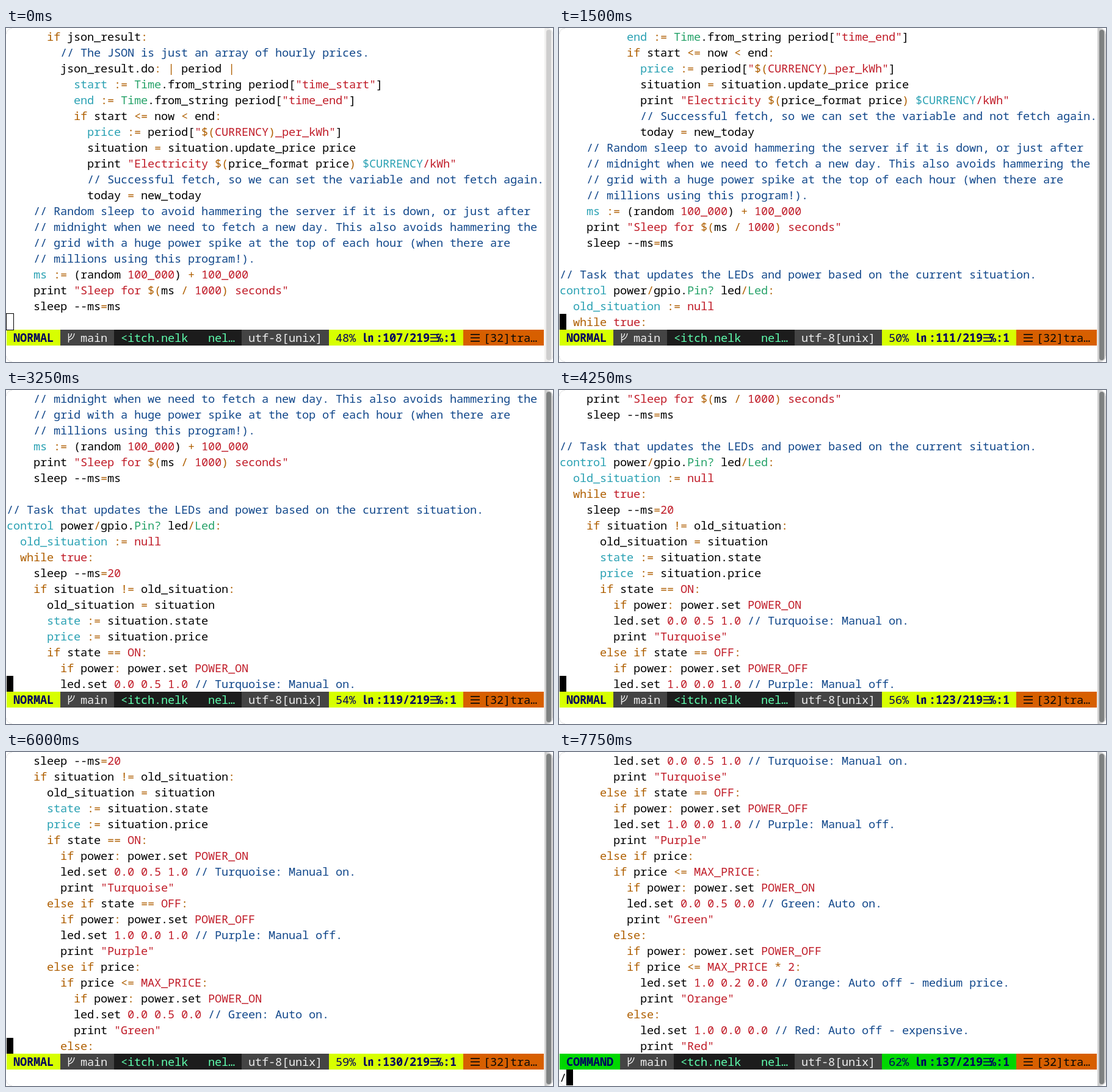
Write an HTML page with a canvas that moves like this. It is 896x548 px and loops after 8000 ms.

```html
<!DOCTYPE html>
<html lang="en">
<head>
<meta charset="utf-8">
<title>Scrolling through code</title>
<style>
  html, body { margin: 0; width: 100%; height: 100%; overflow: hidden; background: #fff; }
  canvas { display: block; }
</style>
</head>
<body>
<canvas id="stage" width="896" height="548"></canvas>
<script>
const FIRST_LINE = 89, TOTAL_LINES = 219, ROWS = 19;
const CELL_W = 11, CELL_H = 26, ASCENT = 20;
const LOOP = 8000, TICK = 250;
const RED = '#c01c28', ORANGE = '#af5f00', CYAN = '#2aa1b3', GREEN = '#26a269', BLUE = '#12488b';
const NAVY = '#00005f';

const source = String.raw`
      if json_result:
        // The JSON is just an array of hourly prices.
        json_result.do: | period |
          start := Time.from_string period["time_start"]
          end := Time.from_string period["time_end"]
          if start <= now < end:
            price := period["$(CURRENCY)_per_kWh"]
            situation = situation.update_price price
            print "Electricity $(price_format price) $CURRENCY/kWh"
            // Successful fetch, so we can set the variable and not fetch again.
            today = new_today
    // Random sleep to avoid hammering the server if it is down, or just after
    // midnight when we need to fetch a new day. This also avoids hammering the
    // grid with a huge power spike at the top of each hour (when there are
    // millions using this program!).
    ms := (random 100_000) + 100_000
    print "Sleep for $(ms / 1000) seconds"
    sleep --ms=ms

// Task that updates the LEDs and power based on the current situation.
control power/gpio.Pin? led/Led:
  old_situation := null
  while true:
    sleep --ms=20
    if situation != old_situation:
      old_situation = situation
      state := situation.state
      price := situation.price
      if state == ON:
        if power: power.set POWER_ON
        led.set 0.0 0.5 1.0 // Turquoise: Manual on.
        print "Turquoise"
      else if state == OFF:
        if power: power.set POWER_OFF
        led.set 1.0 0.0 1.0 // Purple: Manual off.
        print "Purple"
      else if price:
        if price <= MAX_PRICE:
          if power: power.set POWER_ON
          led.set 0.0 0.5 0.0 // Green: Auto on.
          print "Green"
        else:
          if power: power.set POWER_OFF
          if price <= MAX_PRICE * 2:
            led.set 1.0 0.2 0.0 // Orange: Auto off - medium price.
            print "Orange"
          else:
            led.set 1.0 0.0 0.0 // Red: Auto off - expensive.
            print "Red"`.slice(1).split('\n');

// Later rules override earlier ones.
const rules = [
  [/\b([A-Z_]{2,}|\d[\d_.]*|null|true)\b/g, RED],
  [/\b(if|else|while)\b|[:!<]=|[=<:|+*\/]/g, ORANGE],
  [/\b(Time\b|Pin\?|Led\b)/g, GREEN],
  [/\w+(?= :=)|^\w+/g, CYAN],
  [/"[^"$]*"?|(?<=\$\([^)]*\)|\$[A-Z]+\b)[^"$]*"?/g, RED],
  [/\$\(|(?<=\$\([^)]*)\)/g, ORANGE],
  [/\$[A-Z]+/g, CYAN],
  [/\/\/.*/g, BLUE],
];

function highlight(text) {
  const colors = Array(text.length).fill('#000');
  for (const [pattern, color] of rules)
    for (const match of text.matchAll(pattern))
      colors.fill(color, match.index, match.index + match[0].length);
  return { text, colors };
}

const lines = source.map(highlight);
const ctx = document.getElementById('stage').getContext('2d');

const cellX = col => 1 + col * CELL_W;
const cellY = row => 1 + row * CELL_H;

function rect(x, y, w, h, color) {
  ctx.fillStyle = color;
  ctx.fillRect(x, y, w, h);
}

function setFont(weight = 400) {
  ctx.font = `${weight} 18.67px "Noto Sans Mono", "Noto Sans CJK JP", "DejaVu Sans Mono", monospace`;
}

function write(text, col, row, colors) {
  [...text].forEach((char, i) => {
    ctx.fillStyle = Array.isArray(colors) ? colors[i] : colors;
    if (char !== ' ') ctx.fillText(char, cellX(col + i), cellY(row) + ASCENT);
  });
}

function segment(from, to, background) {
  rect(cellX(from), cellY(ROWS), (to - from) * CELL_W, CELL_H, background);
}

function bars(col, color) {
  for (const y of [502, 507.5, 513]) rect(cellX(col) + 1, y, 15, 1.7, color);
}

function branchIcon(col) {
  const x = cellX(col);
  ctx.strokeStyle = '#eee';
  ctx.lineWidth = 1.4;
  ctx.beginPath();
  ctx.moveTo(x + 2.5, 501); ctx.lineTo(x + 2.5, 516);
  ctx.moveTo(x + 2.5, 508); ctx.quadraticCurveTo(x + 7, 507, x + 7.5, 501);
  ctx.moveTo(x + 2.5, 512); ctx.quadraticCurveTo(x + 11, 510, x + 12, 501);
  ctx.stroke();
}

function drawStatus(line, command) {
  const mode = command ? 'COMMAND' : 'NORMAL';
  const accent = command ? '#00d700' : '#d7ff00';
  const branch = mode.length + 2, file = branch + 8;

  segment(0, branch, accent);
  segment(branch, file, '#444');
  segment(file, 35, '#1c1c1c');
  segment(35, 48, '#444');
  segment(48, 68, accent);
  segment(68, 80, '#d75f00');

  branchIcon(branch + 1);
  write('main', branch + 3, ROWS, '#eee');
  write(command ? '<tch.nelk' : '<itch.nelk', file + 1, ROWS, '#5fffaf');
  write('nel…', 30, ROWS, '#5fffaf');
  write('utf-8[unix]', 36, ROWS, '#eee');
  write(Math.floor(line / TOTAL_LINES * 100) + '%', 49, ROWS, NAVY);
  write('[32]tra…', 71, ROWS, '#080808');
  bars(69, '#080808');

  setFont(700);
  write(mode, 1, ROWS, NAVY);
  write('㏑', 53, ROWS, NAVY);
  write(`:${line}/${TOTAL_LINES}`, 55, ROWS, NAVY);
  write('℅:1', 64, ROWS, NAVY);
  bars(63, NAVY);
  setFont();
}

function drawCursor(line, focused, command) {
  if (command) {
    write('/', 0, ROWS + 1, '#000');
    rect(cellX(1), cellY(ROWS + 1), CELL_W, CELL_H, '#000');
  } else if (focused) {
    const { text, colors } = lines[line - FIRST_LINE];
    rect(cellX(0), cellY(ROWS - 1), CELL_W, CELL_H, colors[0] || '#000');
    write(text.slice(0, 1), 0, ROWS - 1, '#fff');
  } else {
    ctx.strokeStyle = '#000';
    ctx.lineWidth = 1;
    ctx.strokeRect(0.5, 468.5, 12, 27);
  }
}

function drawScrollbar(tick) {
  const step = Math.min(tick, 2);
  rect(882, 0, 14, 548, ['#f0efee', '#dfdedd', '#cecece'][step]);
  ctx.fillStyle = ['#cecece', '#a6a7a7', '#7e8181'][step];
  ctx.beginPath();
  ctx.roundRect(885, 3, 8, 542, 4);
  ctx.fill();
}

function drawCorners() {
  ctx.strokeStyle = '#e4e4e4';
  ctx.lineWidth = 1;
  [[10, 10], [886, 10], [886, 538], [10, 538]].forEach(([x, y], i) => {
    ctx.beginPath();
    ctx.arc(x, y, 9.5, Math.PI * (1 + i / 2), Math.PI * (1.5 + i / 2));
    ctx.stroke();
  });
}

function draw(now) {
  const tick = Math.floor(now % LOOP / TICK);
  const scrolled = Math.floor(109.38 + 4.31 * (tick * TICK / 1000 - 1));
  const line = Math.max(107, Math.min(137, scrolled));
  const command = tick === LOOP / TICK - 1;

  rect(0, 0, 896, 548, '#fff');
  ctx.save();
  ctx.beginPath();
  ctx.roundRect(0, 0, 896, 548, 10);
  ctx.clip();
  setFont();
  for (let row = 0; row < ROWS; row++) {
    const { text, colors } = lines[line - FIRST_LINE - ROWS + 1 + row];
    write(text, 0, row, colors);
  }
  drawStatus(line, command);
  drawCursor(line, tick > 0, command);
  drawScrollbar(tick);
  ctx.restore();
  drawCorners();
}

let start;
function loop(now) {
  start ??= now;
  draw(now - start);
  requestAnimationFrame(loop);
}
requestAnimationFrame(loop);
</script>
</body>
</html>
```
